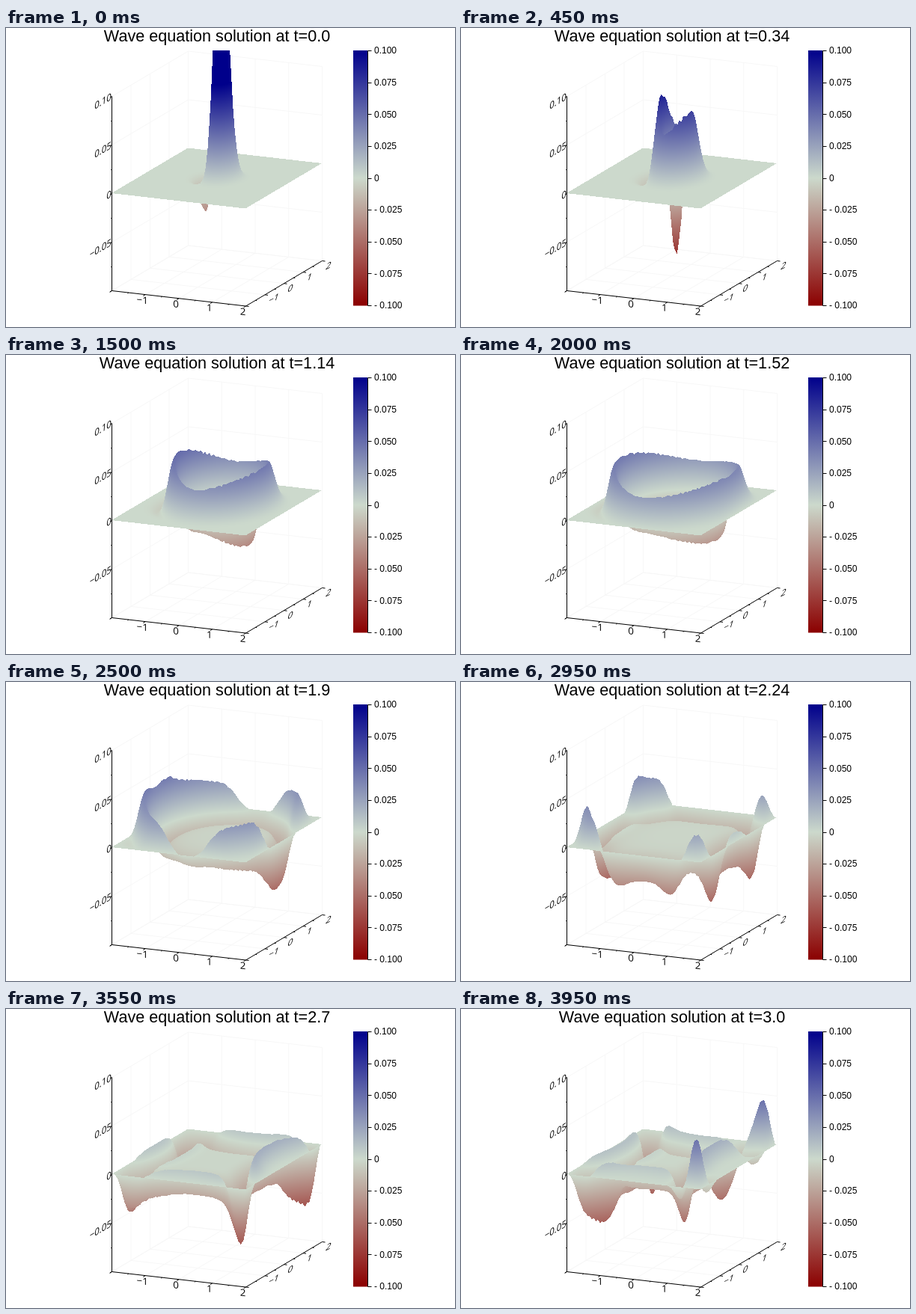
Write an HTML page with a canvas that moves like this. It is 600 px wide and 400 px high and loops after 4 s.

```html
<!DOCTYPE html>
<html lang="en">
<head>
<meta charset="utf-8">
<title>Wave equation</title>
<style>
  html, body { margin: 0; width: 100%; height: 100%; overflow: hidden; background: #fff; }
  svg, canvas { position: absolute; left: 0; top: 0; width: 600px; height: 400px; }
  text { font-family: "Liberation Sans", Arial, sans-serif; fill: #000; }
  .axis text { font: 400 13.5px "Open Sans", Lato, sans-serif; }
</style>
</head>
<body>
<svg id="back" viewBox="0 0 600 400"></svg>
<canvas id="plot" width="600" height="400"></canvas>
<svg id="front" viewBox="0 0 600 400">
  <defs>
    <linearGradient id="ramp" x1="0" y1="0" x2="0" y2="1">
      <stop offset="0" stop-color="#00008b"/>
      <stop offset=".5" stop-color="#ccd9cc"/>
      <stop offset="1" stop-color="#8b0000"/>
    </linearGradient>
  </defs>
  <text id="title" x="282" y="18.3" font-size="21.6" text-anchor="middle"></text>
  <rect x="464" y="30" width="19" height="341.5" fill="url(#ramp)"/>
</svg>
<script>
const FRAMES = 80, STEP = 50, T_END = 3;
const CELLS = 50, MODES = 32, HALF = 2;
const W = 600, H = 400, TOP = 30;
const back = document.getElementById("back");
const front = document.getElementById("front");
const title = document.getElementById("title");
const ctx = document.getElementById("plot").getContext("2d");

// Parallel projection of the plot box to the stage
const project = (x, y, z) => [
  281.5 + 44.75 * x + 25.5 * y,
  201 + 5.125 * x - 15.125 * y - 1300 * z
];

function add(parent, tag, attrs, text) {
  const el = document.createElementNS("http://www.w3.org/2000/svg", tag);
  for (const k in attrs) el.setAttribute(k, attrs[k]);
  if (text !== undefined) el.textContent = text;
  parent.appendChild(el);
  return el;
}
// Lines run through pixel centres
function line(parent, [x1, y1], [x2, y2], stroke = "#000") {
  add(parent, "line", { x1, y1, x2, y2, stroke, transform: "translate(.5 .5)" });
}
function tick([x, y], dx, dy) {
  line(front, [x, y], [x + dx, y + dy]);
}

function drawGrid() {
  const seg = (a, b) => line(back, project(...a), project(...b), "#f7f7f7");
  for (let v = -2; v <= 2; v++) {
    const z = v / 20;
    seg([v, -2, -.1], [v, 2, -.1]);
    seg([v, 2, -.1], [v, 2, .1]);
    seg([-2, v, -.1], [2, v, -.1]);
    seg([-2, v, -.1], [-2, v, .1]);
    seg([-2, -2, z], [-2, 2, z]);
    seg([-2, 2, z], [2, 2, z]);
  }
}

function drawAxes() {
  const a = project(-2, -2, -.1), b = project(2, -2, -.1);
  line(front, project(-2, -2, .1), a);
  line(front, a, b);
  line(front, b, project(2, 2, -.1));

  const labels = add(front, "g", { class: "axis" });
  const label = ([x, y], matrix, anchor, text) => add(labels, "text", {
    transform: `matrix(${matrix} ${x} ${y})`, "text-anchor": anchor
  }, text);
  const shift = ([x, y], dx, dy) => [x + dx, y + dy];
  const signed = s => String(s).replace("-", "\u2212");

  for (let k = -4; k <= 4; k++) {
    const v = k / 2, z = k / 40, len = k % 2 ? .5 : 1;
    const px = project(v, -2, -.1), py = project(2, v, -.1), pz = project(-2, -2, z);
    tick(px, -3 * len, 1.8 * len);
    tick(py, 4 * len, .5 * len);
    tick(pz, -2.5 * len, 1.5 * len);
    if (k % 2 || k === -4) continue;
    label(shift(px, -3.5, 12.3), ".99 .11 0 .95", "middle", signed(v));
    label(shift(py, 4.5, 12.8), ".86 -.42 -.28 .92", "start", signed(v));
    label(shift(pz, -.5, 4.8), ".84 -.5 -.08 1", "end", z ? signed(z.toFixed(2)) : "0");
  }
}

function drawBar() {
  line(front, [483, 30], [483, 371]);
  for (let k = -4; k <= 4; k++) {
    const y = 200.5 - k * 42.6;
    tick([483, Math.round(y)], 5, 0);
    const num = (Math.abs(k) / 40).toFixed(3);
    const text = k ? (k < 0 ? "- " : "") + num : "0";
    add(front, "text", { x: 492, y: y + 4.2, "font-size": 12 }, text);
  }
}

// Fixed-edge membrane at rest, released from a lopsided bell, as sine modes
const waveNo = m => (m + 1) * Math.PI / (2 * HALF);
const sine = (m, x) => Math.sin(waveNo(m) * (x + HALF));
function coefs(f) {
  const n = 400, h = 2 * HALF / n;
  return Array.from({ length: MODES }, (_, m) => {
    let sum = 0;
    for (let i = 1; i < n; i++) {
      const x = -HALF + i * h;
      sum += f(x) * sine(m, x);
    }
    return sum * h / HALF;
  });
}
const bell = x => Math.exp(-11.5 * x * x);
const cx = coefs(x => (x + .205) * bell(x));
const cy = coefs(bell);
const grid = Array.from({ length: CELLS + 1 }, (_, i) => -HALF + 2 * HALF * i / CELLS);
const basis = grid.map(x => cx.map((_, m) => sine(m, x)));

function heights(t) {
  const amp = cx.map((a, m) => cy.map((b, n) =>
    a * b * Math.cos(Math.hypot(waveNo(m), waveNo(n)) * t)));
  return basis.map(sx => {
    const part = cy.map((_, n) => sx.reduce((s, v, m) => s + v * amp[m][n], 0));
    return basis.map(sy => sy.reduce((s, v, n) => s + v * part[n], 0));
  });
}

const image = ctx.createImageData(W, H);
const pixels = new Uint32Array(image.data.buffer);

function shade(z) {
  const v = Math.max(-1, Math.min(1, z * 10)), q = Math.abs(v);
  const dim = 204 * (1 - q), green = 217 * (1 - q), deep = 204 - 65 * q;
  const r = v < 0 ? deep : dim, b = v < 0 ? dim : deep;
  return (255 << 24 | Math.round(b) << 16 | Math.round(green) << 8 | Math.round(r)) >>> 0;
}

// Hard-edged triangle with height blended between its corners
function fill(a, b, c) {
  const [ax, ay, az] = a, [bx, by, bz] = b, [cx, cy, cz] = c;
  const area = (bx - ax) * (cy - ay) - (by - ay) * (cx - ax);
  if (!area) return;
  const x0 = Math.max(0, Math.floor(Math.min(ax, bx, cx)));
  const x1 = Math.min(W - 1, Math.ceil(Math.max(ax, bx, cx)));
  const y0 = Math.max(TOP, Math.floor(Math.min(ay, by, cy)));
  const y1 = Math.min(H - 1, Math.ceil(Math.max(ay, by, cy)));
  for (let y = y0; y <= y1; y++) {
    const py = y + .5;
    for (let x = x0; x <= x1; x++) {
      const px = x + .5;
      const u = ((bx - px) * (cy - py) - (by - py) * (cx - px)) / area;
      const v = ((cx - px) * (ay - py) - (cy - py) * (ax - px)) / area;
      const w = 1 - u - v;
      if (u < -1e-9 || v < -1e-9 || w < -1e-9) continue;
      pixels[y * W + x] = shade(u * az + v * bz + w * cz);
    }
  }
}

function drawSurface(t) {
  const pts = heights(t).map((col, i) =>
    col.map((z, j) => [...project(grid[i], grid[j], z), z]));
  pixels.fill(0);
  // far cells first
  for (let j = CELLS - 1; j >= 0; j--) {
    for (let i = 0; i < CELLS; i++) {
      const p = pts[i][j], q = pts[i + 1][j], r = pts[i][j + 1], s = pts[i + 1][j + 1];
      fill(q, r, s);
      fill(p, q, r);
    }
  }
  ctx.putImageData(image, 0, 0);
}

function clock(t) {
  const s = String(Number(t.toFixed(2)));
  return s.includes(".") ? s : s + ".0";
}

const start = performance.now();
let shown = -1;
function render() {
  const n = Math.floor((performance.now() - start) / STEP) % FRAMES;
  if (n !== shown) {
    shown = n;
    const t = T_END * n / (FRAMES - 1);
    title.textContent = "Wave equation solution at t=" + clock(t);
    drawSurface(t);
  }
  requestAnimationFrame(render);
}

drawGrid();
drawAxes();
drawBar();
render();
</script>
</body>
</html>
```
